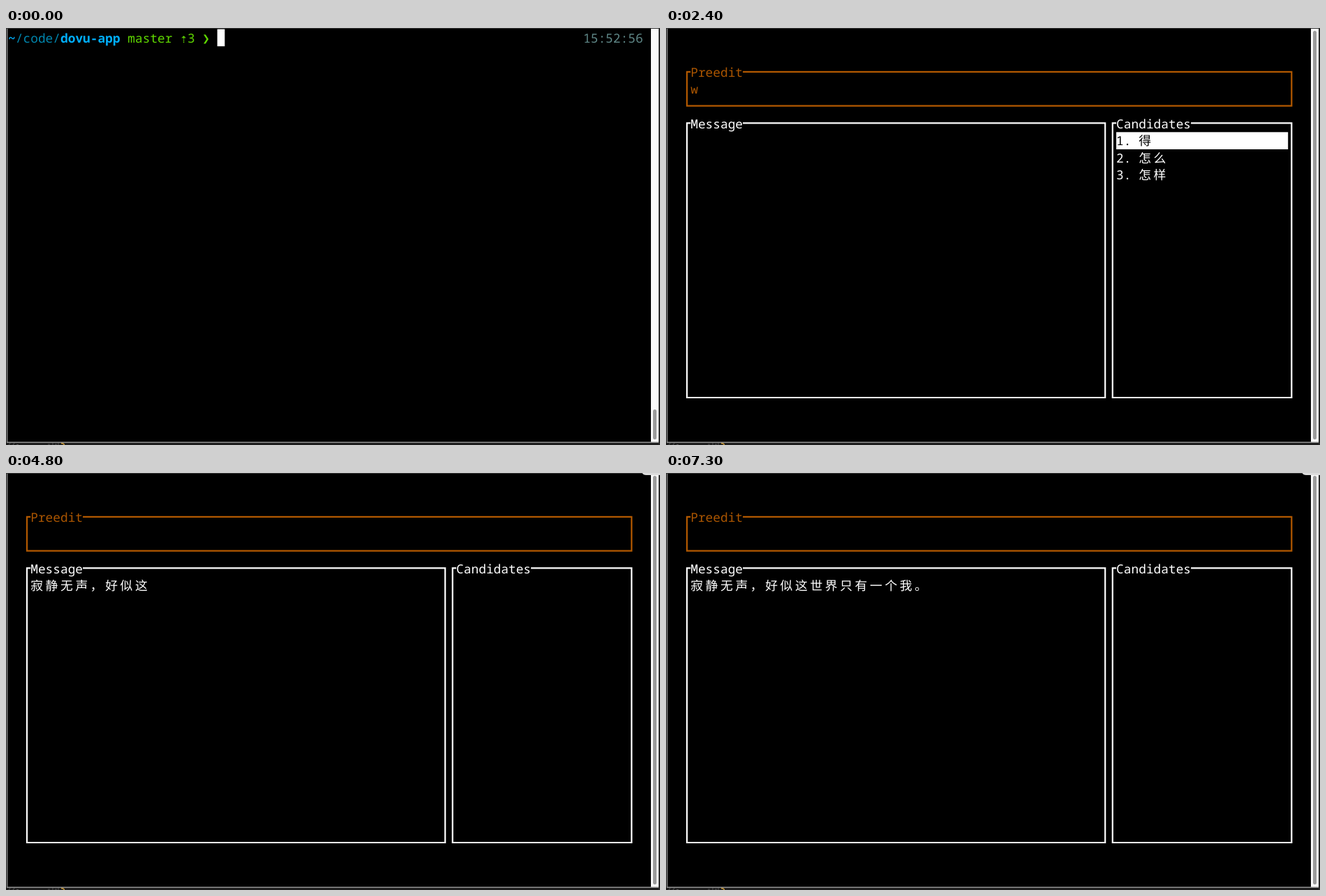
Write an HTML page that moves like this. It is 937x598 px and loops after 8 s.

```html
<!DOCTYPE html>
<html lang="zh-CN">
<head>
<meta charset="utf-8">
<title>Terminal input method</title>
<style>
  html, body { margin: 0; width: 100%; height: 100%; overflow: hidden; background: #000; }
  svg { display: block; width: 937px; height: 598px; }
  text {
    font: 17.83px "Noto Sans Mono", "Noto Sans CJK SC", monospace;
    fill: #fff; white-space: pre; text-rendering: geometricPrecision;
  }
  .wide { font-family: "Noto Sans CJK SC", "Noto Sans CJK", sans-serif; }
  .sym { font-family: "DejaVu Sans Mono", monospace; }
  .dir { fill: #0087af; }
  .name { fill: #00afff; font-weight: 700; }
  .git { fill: #5fd700; }
  .clock { fill: #5f8787; }
  .amber { fill: #aa5500; }
  .dark { fill: #000; }
  .frame { fill: none; stroke: #fff; stroke-width: 2.2; }
  .frame.hot { stroke: #b35900; }
</style>
</head>
<body>
<svg viewBox="0 0 937 598">
  <rect width="937" height="598" fill="#1c1c1c"/>
  <rect x="1" y="0" width="935" height="595" fill="#8c8c8c"/>
  <rect x="2.3" y="1" width="922" height="592.4" fill="#000"/>
  <rect x="0" y="0" width="937" height="1" fill="#333"/>
  <rect x="924" y="1" width="11" height="592.5" fill="#fafafa"/>
  <rect x="935" y="1" width="2" height="597" fill="#2a2a2a"/>
  <rect id="thumb" x="927" width="5" rx="2.5" fill="#9b9b9b"/>
  <g fill="none" stroke="#555" stroke-width="1">
    <path d="M4 598l2-3M10 598l2-3M15 597.5h3M60 597h3M67 595v3M70 597h3M75 595v3"/>
    <path d="M79 595.5q4 0 4.500 2.500" stroke="#c99a3c" stroke-width="1.500"/>
  </g>
  <g id="shell"></g>
  <g id="app"></g>
  <g id="live"></g>
  <path id="corner" d="M911.500 0H937V3H917Q913 3 911.500 0Z" fill="#dcdcdc"/>
</svg>
<script>
const NS = "http://www.w3.org/2000/svg";
const CELL = 10.7, ROW = 24.62, LEFT = 3.1, TOP = 1.2;
const $ = id => document.getElementById(id);
const colX = c => LEFT + c * CELL;
const rowY = r => TOP + r * ROW;

function add(parent, tag, attrs, content = "") {
  const el = document.createElementNS(NS, tag);
  for (const k in attrs) el.setAttribute(k, attrs[k]);
  el.textContent = content;
  parent.append(el);
}
function put(parent, col, row, str, cls = "") {
  add(parent, "text", { x: colX(col), y: rowY(row) + 19.3, class: cls }, str);
}
// Full-width characters take two cells each.
function putWide(parent, col, row, str, cls = "") {
  const x = [...str].map((_, i) => colX(col + 2 * i)).join(" ");
  add(parent, "text", { x, y: rowY(row) + 19.3, class: "wide " + cls }, str);
}
function block(parent, col, row, cols) {
  add(parent, "rect", { x: colX(col), y: rowY(row) + .4, width: cols * CELL, height: ROW, fill: "#fff" });
}
function panel(x1, y1, x2, y2, col, row, title, hot) {
  const from = colX(col), to = colX(col + title.length);
  add($("app"), "path", {
    d: `M${from} ${y1}H${x1}V${y2}H${x2}V${y1}H${to}`,
    class: hot ? "frame hot" : "frame"
  });
  put($("app"), col, row, title, hot ? "amber" : "");
}

const shell = $("shell");
put(shell, 0, 0, "~", "name");
put(shell, 1, 0, "/code/", "dir");
put(shell, 7, 0, "dovu-app", "name");
put(shell, 16, 0, "master", "git");
put(shell, 23, 0, "⇡", "git sym");
put(shell, 24, 0, "3", "git");
put(shell, 26, 0, "❯", "git sym");
put(shell, 77, 0, "15:52:56", "clock");

panel(30, 62.8, 896.3, 111.7, 3, 2, "Preedit", true);
panel(30, 136.4, 629.2, 530, 3, 5, "Message");
panel(639.8, 136.4, 896.3, 530, 60, 5, "Candidates");

const COMMAND = "LANG=zh_CN.UTF-8 ./build/release/bin/dovu-app";
const MESSAGE = "寂静无声，好似这世界只有一个我。";

// [start ms, preedit, committed characters, candidates]
const steps = [
  [1500, "", 0, ""],
  [2400, "w", 0, "得 怎么 怎样"],
  [2500, "wu", 0, "无 五 物 务"],
  [2600, "", 0, ""],
  [3000, "jj", 0, "寂静 经济 积极"],
  [3200, "jjwu", 0, ""],
  [3400, "", 5, ""],
  [4100, "h", 5, "和 好 会"],
  [4200, "hc", 5, "好 号 毫"],
  [4400, "hcs", 5, "好 好像是 好说"],
  [4500, "hcsi", 5, "好似 好思 毫丝"],
  [4700, "v", 7, "这 着 中 真"],
  [4800, "", 8, ""],
  [5100, "u", 8, "是 上 时"],
  [5200, "ui", 8, "是 时 世"],
  [5600, "", 10, ""],
  [6200, "viyz", 10, "只有 之有 至由"],
  [6500, "", 12, ""],
  [6900, "y", 12, "一 有 也 要"],
  [7000, "yige", 12, "一个 一格 一各"],
  [7200, "wo", 14, "我 握 窝"],
  [7300, "", 16, ""]
];

function drawShell(t) {
  const live = $("live");
  if (t >= 400) put(live, 28, 0, COMMAND);
  if (t < 400) block(live, 28, 0, 1);
  else if (t < 700) block(live, 28 + COMMAND.length, 0, 1);
  else block(live, 0, 1, 1);
}
function drawApp([, code, count, list]) {
  const live = $("live");
  put(live, 3, 3, code, "amber");
  putWide(live, 3, 6, MESSAGE.slice(0, count));
  if (!list) return;
  block(live, 60, 6, 23);
  list.split(" ").forEach((word, i) => {
    const cls = i ? "" : "dark";
    put(live, 60, 6 + i, `${i + 1}.`, cls);
    putWide(live, 63, 6 + i, word, cls);
  });
}

const marks = [0, 400, 700, ...steps.map(s => s[0])];
const start = performance.now();
let shown = -1;

function tick() {
  const t = (performance.now() - start) % 8000;
  const now = marks.findLastIndex(m => t >= m);
  if (now !== shown) {
    shown = now;
    const inApp = t >= 1500;
    $("live").replaceChildren();
    shell.style.display = inApp ? "none" : "";
    $("app").style.display = inApp ? "" : "none";
    $("corner").style.display = t >= 4100 ? "" : "none";
    $("thumb").setAttribute("y", inApp ? 4 : 547);
    $("thumb").setAttribute("height", inApp ? 586 : 43);
    if (inApp) drawApp(steps[now - 3]);
    else drawShell(t);
  }
  requestAnimationFrame(tick);
}
tick();
</script>
</body>
</html>
```
